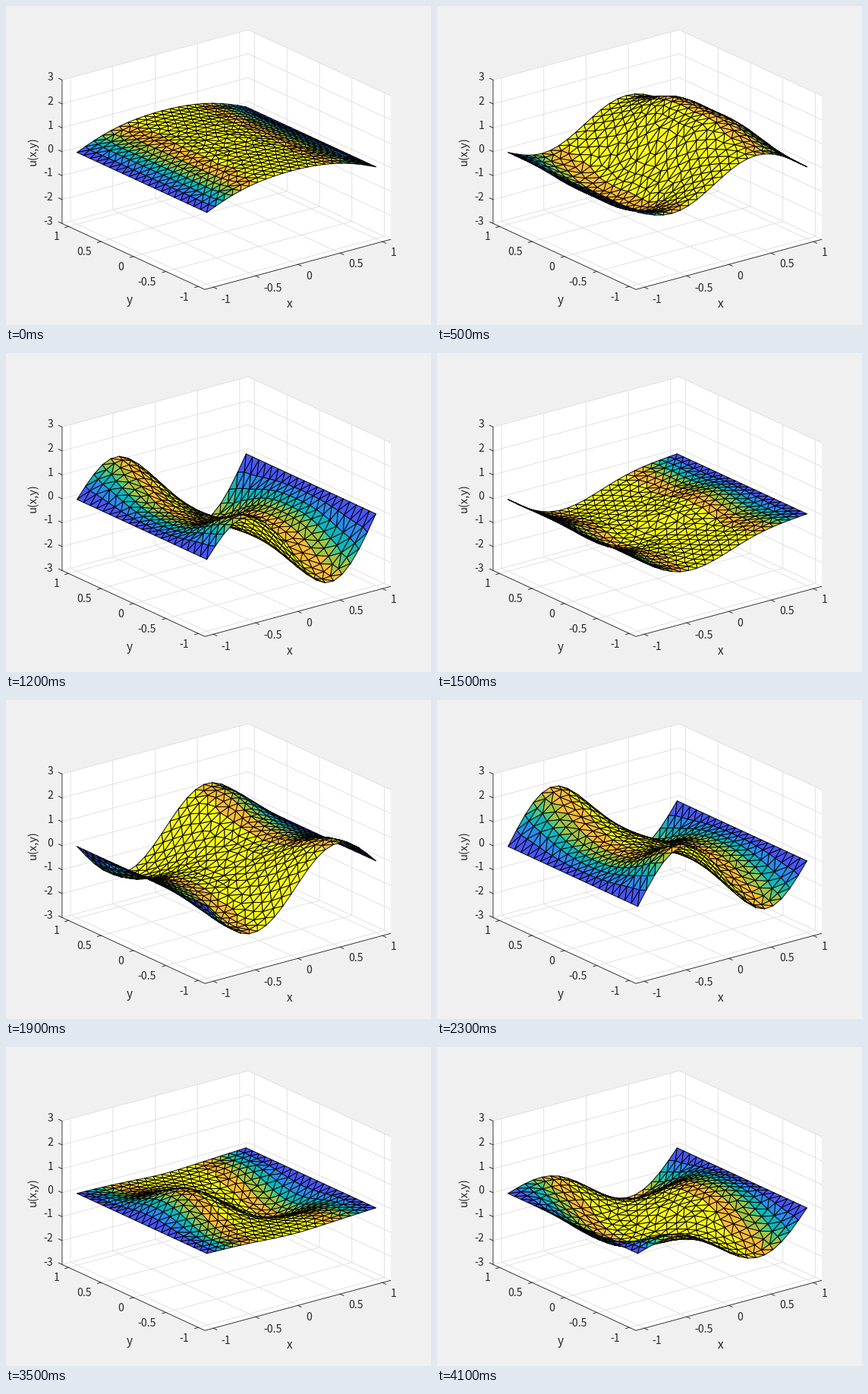
These frames come from a looping animation (560 px wide and 420 px high, 4200 ms). A matplotlib script:

```python
import numpy as np
import matplotlib.pyplot as plt
from matplotlib.animation import FuncAnimation
from matplotlib.collections import PolyCollection
from matplotlib.tri import Triangulation

W, H, DPI = 560, 420, 100
PX = 72 / DPI                       # one pixel in points
STEPS, DT = 41, 0.15
LIM = 1.1
FONT = "Noto Sans CJK JP"
DARK, GRID = "#262626", "#dfdfdf"
BANDS = [0.17, 0.31, 0.45, 0.56, 0.69, 0.87]
COLORS = np.array([
    (0.28, 0.34, 0.98), (0.17, 0.55, 0.93), (0.06, 0.71, 0.74),
    (0.28, 0.79, 0.54), (0.65, 0.77, 0.25), (0.99, 0.74, 0.22),
    (0.98, 0.98, 0.10)])


def project(x, y, z):
    """Orthographic view of data space, in stage pixels."""
    return np.stack([290.5 + 111.4 * x - 85.5 * y,
                     202.3 - 30 * x - 39.5 * y - 31.5 * z], axis=-1)


def build_mesh(size=0.1):
    """Triangles laid in square rings from the border to the centre."""
    rng = np.random.default_rng(4)
    pts = []
    for k in range(12):
        half = 1 - k * size * 0.866
        odd = k % 2
        n = max(1, 2 * round((2 * half / size - odd) / 2) + odd)
        s = np.linspace(-half, half, n + 1)[:-1]
        e = np.full(n, half)
        ring = np.concatenate([np.c_[s, -e], np.c_[e, s],
                               np.c_[-s, e], np.c_[-e, -s]])
        if k > 5:
            ring += rng.uniform(-0.012, 0.012, ring.shape)
        pts.append(ring)
    x, y = np.concatenate(pts).T
    return x, y, Triangulation(x, y).triangles


def start_shape(x):
    return np.arctan(np.cos(np.pi / 2 * x))


# Wave equation by separation: fixed at x = -1 and 1, free at y = -1 and 1.
# u(0) = atan(cos(pi x / 2)),  u_t(0) = 3 sin(pi x) exp(cos(pi y))
THETA = (np.arange(2000) + 0.5) / 2000 * 2 * np.pi
ODD = np.arange(1, 16, 2)
A = [2 * np.mean(np.arctan(np.cos(THETA)) * np.cos(m * THETA)) for m in ODD]
B = [(2 if k else 1) * np.mean(np.exp(np.cos(THETA)) * np.cos(k * THETA))
     for k in range(7)]


def wave(x, y, t):
    u = sum(a * np.cos(m * np.pi / 2 * x) * np.cos(m * np.pi / 2 * t)
            for m, a in zip(ODD, A))
    for k, b in enumerate(B):
        w = np.pi * np.sqrt(1 + k * k)
        u = u + 3 * b / w * np.sin(w * t) * np.sin(np.pi * x) * np.cos(k * np.pi * y)
    return u


fig = plt.figure(figsize=(W / DPI, H / DPI), dpi=DPI, facecolor="#f0f0f0")
ax = fig.add_axes([0, 0, 1, 1])
ax.set_xlim(0, W)
ax.set_ylim(H, 0)
ax.axis("off")


def path(points, color, width):
    p = np.array([project(*q) for q in points])
    ax.plot(p[:, 0], p[:, 1], color=color, lw=width * PX,
            solid_capstyle="butt", zorder=1)


def tick(point, dx, dy):
    px, py = project(*point)
    ax.plot([px, px + dx], [py, py + dy], color=DARK, lw=0.9 * PX, zorder=1)


def label(x, y, s, ha, size=14, **kw):
    ax.text(x, y, s, ha=ha, va="center_baseline" if kw.pop("mid", False) else "baseline",
            family=FONT, fontsize=size * PX, color=DARK, **kw)


def draw_axes():
    a, b = -LIM, LIM
    walls = ([(a, a, -3), (b, a, -3), (b, b, -3), (a, b, -3)],
             [(a, b, -3), (b, b, -3), (b, b, 3), (a, b, 3)],
             [(b, a, -3), (b, b, -3), (b, b, 3), (b, a, 3)])
    ax.add_collection(PolyCollection(
        [[project(*q) for q in w] for w in walls],
        facecolor="white", edgecolor="none", zorder=0))

    for i, v in enumerate(np.linspace(-1, 1, 5)):
        path([(v, a, -3), (v, b, -3), (v, b, 3)], GRID, 0.9)
        path([(a, v, -3), (b, v, -3), (b, v, 3)], GRID, 0.9)
        tick((v, a, -3), 4.6, 2.1)
        tick((a, v, -3), -4.8, 1.3)
        label(283 + 56 * i, 391 - 15.5 * i, f"{v:g}", "left")
        label(241 - 42.75 * i, 388 - 19.9 * i, f"{v:g}", "right")
    for z in range(-3, 4):
        path([(a, b, z), (b, b, z), (b, a, z)], GRID, 0.9)
        tick((a, b, z), -4.6, -2.1)
        label(62, 193 - 31.5 * z, f"{z}", "right")

    path([(a, b, 3), (a, b, -3), (a, a, -3), (b, a, -3)], DARK, 0.9)
    label(374, 397, "x", "center", 15.4)
    label(163, 392, "y", "center", 15.4)
    ax.text(35, 191.5, "u(x,y)", rotation=90, ha="center", va="center",
            family=FONT, fontsize=14.6 * PX, color=DARK)


draw_axes()
X, Y, TRI = build_mesh()
LEVEL = start_shape(X)[TRI].mean(axis=1) / start_shape(0)
FACES = COLORS[np.digitize(LEVEL, BANDS)]

surface = PolyCollection([], edgecolor="black", linewidth=0.95 * PX,
                         joinstyle="round", zorder=2)
ax.add_collection(surface)


def update(frame):
    step = min(max(frame - 1, 0), STEPS - 1)    # the first pose holds twice as long
    z = wave(X, Y, step * DT)
    nearness = (-74.1 * X - 96.5 * Y + 26 * z)[TRI].mean(axis=1)
    order = np.argsort(nearness)
    surface.set_verts(project(X, Y, z)[TRI[order]])
    surface.set_facecolor(FACES[order])
    return [surface]


anim = FuncAnimation(fig, update, frames=STEPS + 1, interval=100,
                     repeat=True, repeat_delay=0, blit=False)
plt.show()
```
